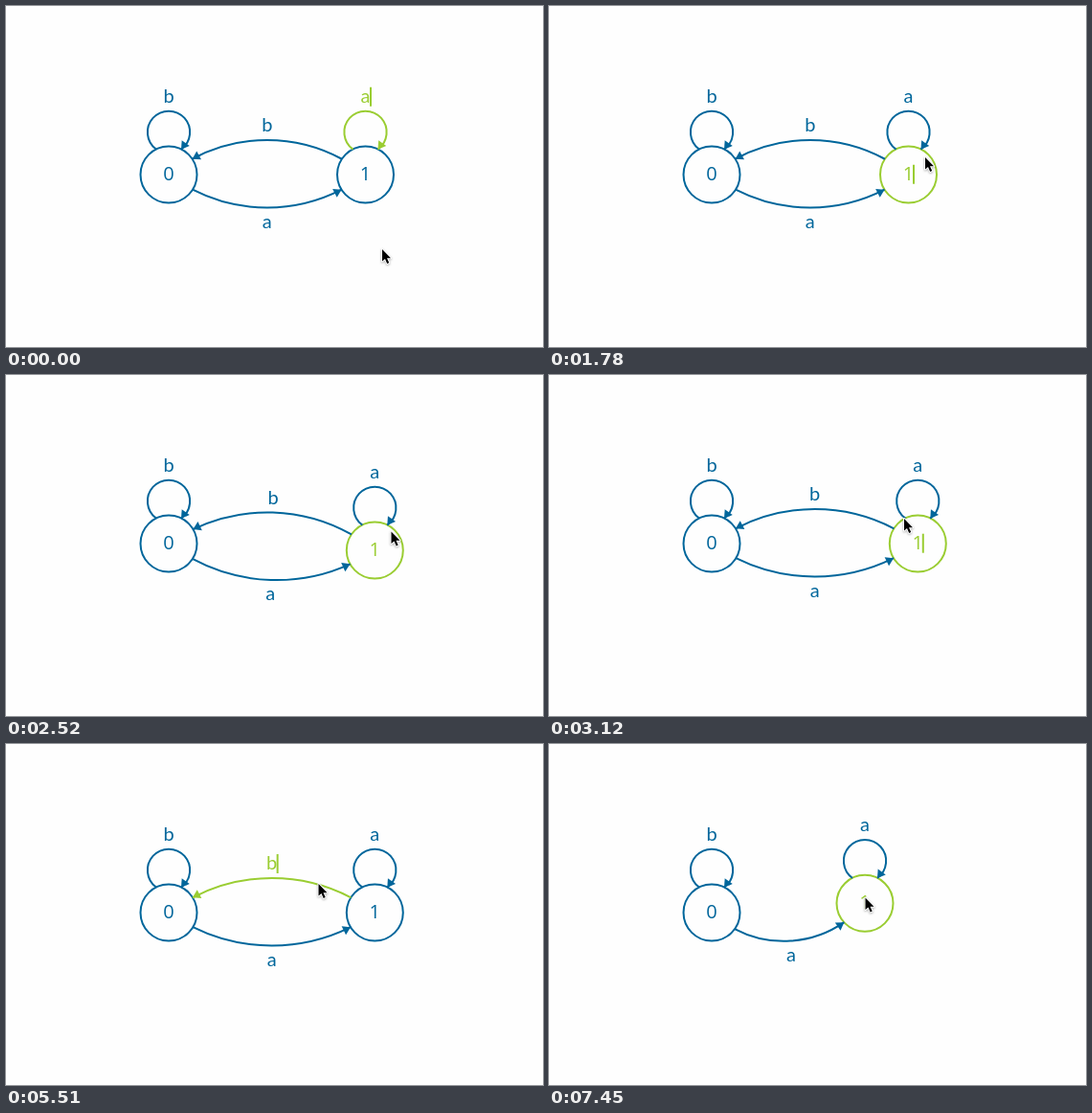
Recreate the animation shown at these times as an HTML page. Size 561x356 px, loop 8000 ms.

```html
<!DOCTYPE html>
<html lang="en">
<head>
<meta charset="utf-8">
<title>State machine editor</title>
<style>
  html, body { margin: 0; width: 100%; height: 100%; overflow: hidden; background: #fefefe; }
  svg { display: block; width: 561px; height: 356px; }
  .part { --ink: #00669b; }
  .part.on { --ink: #9acd32; }
  .line { fill: none; stroke: var(--ink); stroke-width: 2; }
  .head { fill: var(--ink); }
  text { fill: var(--ink); font: 20px Lato, sans-serif; text-anchor: middle; }
  .digit { font-family: "Open Sans", sans-serif; }
  #pointer { filter: drop-shadow(0 1px 1px rgba(0, 0, 0, .3)); }
</style>
</head>
<body>
<svg id="stage" viewBox="0 0 561 356">
  <g id="pointer">
    <path d="M0 0V12.6L3 9.9L5.2 14.9L7.2 14L5 9.2H9Z" fill="#000" stroke="#fff" stroke-width="2" paint-order="stroke" stroke-linejoin="round"/>
  </g>
</svg>
<script>
const LOOP = 8000, R = 29.5;
const stage = document.getElementById('stage');
const pointer = document.getElementById('pointer');
const home = { x: 170, y: 176 };

// Held steps: [start ms, values...]
const pointerSteps = [
  [0, 393, 254], [150, 390, 249], [300, 382, 233], [450, 375, 211],
  [600, 372, 192], [740, 377, 178], [890, 385, 168], [1030, 391, 161],
  [1180, 392, 159], [1330, 393, 158],
  [2070, 395, 166], [2220, 398, 180], [2370, 401, 174], [2520, 402.5, 163.5],
  [2670, 402.5, 157], [2970, 398, 155], [3120, 371, 150], [3270, 338, 146],
  [3420, 325, 145], [3870, 326.5, 146],
  [6560, 344.5, 150], [6710, 376, 164], [6860, 385, 170],
  [7010, 373, 168], [7160, 353, 164], [7310, 337, 161], [7450, 330.5, 160.5]
];
const nodeSteps = [
  [0, 375.5, 176], [2070, 377.5, 184], [2220, 381, 199], [2370, 384, 193],
  [2520, 385.3, 183], [2670, 385.3, 176],
  [7010, 373, 174], [7160, 353, 170], [7310, 337, 167], [7450, 330, 166.3]
];
const selectSteps = [[0, 'loop1'], [1780, 'node1'], [3420, 'back'], [5810, ''], [6860, 'node1']];
const caretSteps = [
  [0, 1], [450, 0], [1030, 1], [1480, 0], [1780, 1], [2370, 0], [2820, 1],
  [4020, 0], [4470, 1], [4920, 0], [5510, 1], [7450, 0]
];
const BACK_GONE = 5810;

const at = (steps, t) => steps.filter(s => s[0] <= t).pop().slice(1);

function add(tag, parent, cls) {
  const el = document.createElementNS('http://www.w3.org/2000/svg', tag);
  if (cls) el.setAttribute('class', cls);
  parent.appendChild(el);
  return el;
}

function set(el, attrs) {
  for (const k in attrs) el.setAttribute(k, attrs[k]);
}

function makePart(label, isNode) {
  const g = add('g', stage, 'part');
  const part = { g, label, line: add(isNode ? 'circle' : 'path', g, 'line') };
  if (!isNode) part.head = add('path', g, 'head');
  part.text = add('text', g, isNode ? 'digit' : '');
  part.text.textContent = label;
  part.caret = add('path', g, 'line');
  return part;
}

const parts = {
  node0: makePart('0', true),
  node1: makePart('1', true),
  loop0: makePart('b'),
  loop1: makePart('a'),
  back: makePart('b'),
  forth: makePart('a')
};
stage.appendChild(pointer);

function placeLabel(part, x, y) {
  set(part.text, { x, y: y + 6.3 });
  const cx = x + (part.label === 'b' ? 6 : 5.5);
  set(part.caret, { d: `M${cx} ${y - 10}v20` });
}

function placeHead(part, x, y, dx, dy) {
  const bx = x - 8 * dx, by = y - 8 * dy;
  set(part.head, { d: `M${x} ${y}L${bx + 5 * dy} ${by - 5 * dx}L${bx - 5 * dy} ${by + 5 * dx}Z` });
}

function placeNode(part, p) {
  set(part.line, { cx: p.x, cy: p.y, r: R });
  placeLabel(part, p.x, p.y - .3);
}

function placeLoop(part, p) {
  const r = R * .75, cy = p.y - R * 1.5, a = Math.PI * .3;
  const ex = r * Math.cos(a), ey = cy + r * Math.sin(a);
  set(part.line, { d: `M${p.x - ex} ${ey}A${r} ${r} 0 1 1 ${p.x + ex} ${ey}` });
  placeHead(part, p.x + ex, ey, Math.cos(a * 7 / 3), Math.sin(a * 7 / 3));
  placeLabel(part, p.x, cy - r - 15);
}

// Arc through both centres, bulging by `sag`, trimmed at the node edges.
function placeLink(part, a, b, sag) {
  const d = Math.hypot(b.x - a.x, b.y - a.y);
  const ux = (b.x - a.x) / d, uy = (b.y - a.y) / d, nx = -uy, ny = ux;
  const r = (d * d / 4 + sag * sag) / (2 * sag);
  const cx = (a.x + b.x) / 2 + nx * (sag - r), cy = (a.y + b.y) / 2 + ny * (sag - r);
  const half = Math.asin(d / 2 / r) - R / r;
  const c = Math.cos(half), s = Math.sin(half);
  const x0 = cx + r * (nx * c - ux * s), y0 = cy + r * (ny * c - uy * s);
  const x1 = cx + r * (nx * c + ux * s), y1 = cy + r * (ny * c + uy * s);
  set(part.line, { d: `M${x0} ${y0}A${r} ${r} 0 0 0 ${x1} ${y1}` });
  placeHead(part, x1, y1, ux * c - nx * s, uy * c - ny * s);
  const slide = Math.sign(nx) * 10.5 * (1 - Math.abs(ny) ** 42);
  placeLabel(part, cx + r * nx + slide, cy + r * ny + 15 * Math.sign(ny));
}

placeNode(parts.node0, home);
placeLoop(parts.loop0, home);

function draw(t) {
  const [x, y] = at(nodeSteps, t), node = { x, y };
  placeNode(parts.node1, node);
  placeLoop(parts.loop1, node);
  placeLink(parts.back, node, home, 36);
  placeLink(parts.forth, home, node, 34.5);
  parts.back.g.style.display = t < BACK_GONE ? '' : 'none';

  const [selected] = at(selectSteps, t), [caret] = at(caretSteps, t);
  for (const id in parts) {
    const on = id === selected;
    parts[id].g.classList.toggle('on', on);
    parts[id].caret.style.display = on && caret ? '' : 'none';
  }
  set(pointer, { transform: `translate(${at(pointerSteps, t)})` });
}

const start = performance.now();
function tick() {
  draw((performance.now() - start) % LOOP);
  requestAnimationFrame(tick);
}
tick();
</script>
</body>
</html>
```
